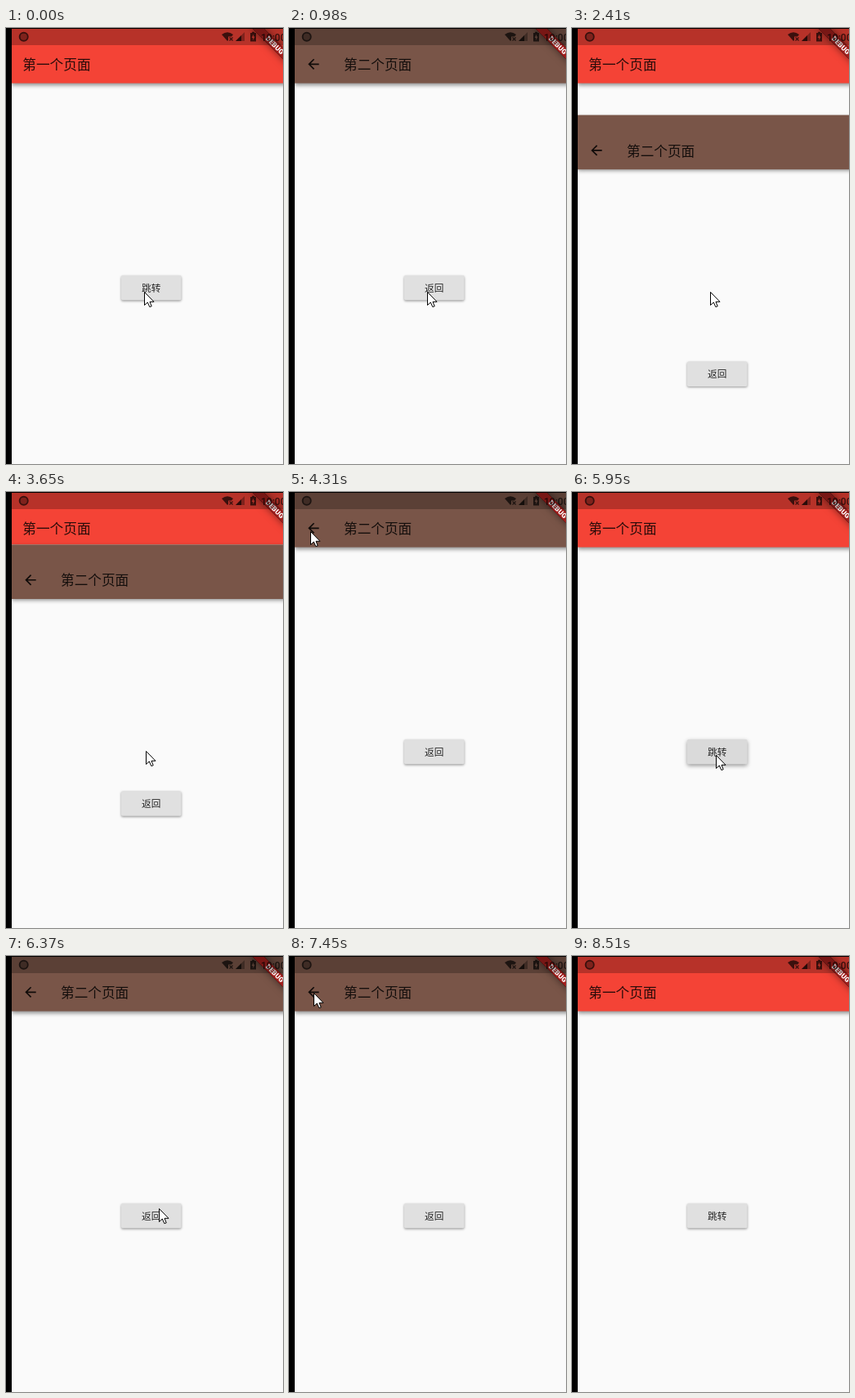
Animation of 339x534 px, one loop 9.1 s. Source, as an HTML page with a canvas:

```html
<!DOCTYPE html>
<html lang="zh-CN">
<head>
<meta charset="utf-8">
<style>
html, body { margin: 0; width: 100%; height: 100%; overflow: hidden; background: #000; }
canvas { display: block; }
</style>
</head>
<body>
<canvas id="stage" width="339" height="534"></canvas>
<script>
const ctx = document.getElementById('stage').getContext('2d');
const LOOP = 9100, TICK = 130, SLIDE = 300, PRESS = 260;
const LEFT = 7, TOP = 1, WIDTH = 342, HEIGHT = 569;
const CJK = '"Noto Sans CJK SC", "Noto Sans CJK", sans-serif';

// The second page alternately opens and closes; `elapsed` is how far each slide is when first seen.
const slides = [
  { at: 850, elapsed: 213 }, { at: 2410, elapsed: 140 },
  { at: 3650, elapsed: 185 }, { at: 4860, elapsed: 154 },
  { at: 6210, elapsed: 226 }, { at: 8130, elapsed: 150 }
];
const journeys = [
  { start: 2690, end: 3230, from: [169, 323], via: [170, 320], to: [171, 317] },
  { start: 3800, end: 4310, from: [171, 317], via: [100, 180], to: [26, 48] },
  { start: 4860, end: 5810, from: [26, 48], via: [70, 190], to: [176, 322] },
  { start: 6200, end: 7450, from: [176, 322], via: [371, 85], to: [30, 45] },
  { start: 8250, end: 8510, from: [30, 45], via: [165, 300], to: [300, 560] }
];

const arrow = new Path2D('M20 11H7.83l5.59-5.59L12 4l-8 8 8 8 1.41-1.41L7.83 13H20z');
const pointer = new Path2D('M.5.5V16.5L4.3 13L6.8 18.6L9.2 17.8L7 12.3H12z');

// Material standard curve: cubic-bezier(.4, 0, .2, 1)
function ease(x) {
  let low = 0, high = 1;
  for (let i = 0; i < 20; i++) {
    const s = (low + high) / 2, r = 1 - s;
    if (1.2 * r * r * s + .6 * r * s * s + s ** 3 < x) low = s; else high = s;
  }
  return low * low * (3 - 2 * low);
}

const ticked = age => TICK * Math.floor(age / TICK);

function sheetAt(t) {
  const index = slides.findLastIndex(s => s.at <= t);
  const { at, elapsed } = slides.at(index);
  const progress = Math.min(1, (elapsed + ticked((t - at + LOOP) % LOOP)) / SLIDE);
  const open = index % 2 === 0;
  const shown = open ? ease(progress) : ease(1 - progress);
  return { open, offset: HEIGHT * (1 - shown) };
}

function cursorAt(t) {
  const { start, end, from, via, to } = journeys.findLast(j => j.start <= t) ?? journeys[0];
  if (t >= end) return to;
  const u = ease(Math.max(0, ticked(t - start) / (end - start))), v = 1 - u;
  return from.map((a, i) => Math.round(v * v * a + 2 * u * v * via[i] + u * u * to[i]));
}

function rect(x, y, w, h, fill) {
  ctx.fillStyle = fill;
  ctx.fillRect(x, y, w, h);
}

function shape(path, fill) {
  ctx.fillStyle = fill;
  ctx.fill(path instanceof Path2D ? path : new Path2D(path));
}

function circle(x, y, r) {
  const path = new Path2D();
  path.arc(x, y, r, 0, 2 * Math.PI);
  return path;
}

function label(text, x, y, font, fill, align = 'left') {
  ctx.font = font;
  ctx.textAlign = align;
  ctx.fillStyle = fill;
  ctx.fillText(text, x, y);
}

function at(x, y, draw) {
  ctx.save();
  ctx.translate(x, y);
  draw();
  ctx.restore();
}

function shadowed(blur, dy, alpha, draw) {
  ctx.save();
  ctx.shadowColor = `rgba(0,0,0,${alpha})`;
  ctx.shadowBlur = blur;
  ctx.shadowOffsetY = dy;
  draw();
  ctx.restore();
}

function button(text, pressed) {
  const box = new Path2D();
  box.roundRect(141, 303, 73.5, 30.3, 1.7);
  shadowed(pressed ? 5 : 3, pressed ? 2 : 1.2, .4,
    () => shape(box, pressed ? '#dadada' : '#e0e0e0'));
  label(text, 177.7, 322.6, `300 11.67px ${CJK}`, 'rgba(0,0,0,.83)', 'center');
}

function page(color, title, titleX, caption, pressed) {
  rect(LEFT, TOP, WIDTH, HEIGHT, '#fafafa');
  shadowed(5, 2, .45, () => rect(LEFT, TOP, WIDTH, 66.6, color));
  label(title, titleX, 51, `300 16.67px ${CJK}`, 'rgba(0,0,0,.83)');
  button(caption, pressed);
}

function backArrow() {
  at(20, 34.3, () => {
    ctx.scale(.833, .833);
    shape(arrow, 'rgba(0,0,0,.87)');
  });
}

function debugBanner() {
  at(LEFT + WIDTH, TOP, () => {
    ctx.rotate(Math.PI / 4);
    shadowed(10, 0, .5, () => rect(-34, 23.3, 68, 10, '#000'));
    rect(-34, 23.3, 68, 10, '#a01e1c');
    label('DEBUG', 0, 31.3, '900 8.5px Roboto, sans-serif', '#fff', 'center');
  });
}

function statusBar() {
  const ink = 'rgba(0,0,0,.68)', faint = 'rgba(0,0,0,.3)';
  rect(LEFT, TOP, WIDTH, 20, 'rgba(0,0,0,.25)');
  ctx.strokeStyle = ink;
  ctx.lineWidth = 2;
  ctx.stroke(circle(21.7, 10.7, 5));
  shape(circle(21.7, 10.7, 4), faint);
  shape('M264 8Q271 2.5 278 8L276 10.5H272V15L271 16z', ink);
  ctx.lineWidth = 1.2;
  ctx.stroke(new Path2D('M273.5 11.5l4 4m0-4l-4 4'));
  shape('M281 16L292 5V16z', faint);
  shape('M281 16L288 9V16z', ink);
  shape('M299 6H301V4.8H304V6H306V16.5H299zM303 7.5L300.7 12H302.2V15L304.5 10.5H303z', ink);
  label('10:00', 312, 15.5, '500 12px Roboto, sans-serif', ink);
}

function render(now) {
  const t = now % LOOP;
  const { open, offset } = sheetAt(t);
  const [x, y] = cursorAt(t);
  const onButton = y > 300 && y < 333;
  const pressed = onButton && slides.some(s => t >= s.at - PRESS && t < s.at);

  page('#f44336', '第一个页面', 20.3, '跳转', pressed && !open);
  at(0, offset, () => {
    page('#795548', '第二个页面', 67, '返回', pressed && open);
    backArrow();
  });
  debugBanner();
  statusBar();
  rect(0, 0, LEFT, 534, '#000');
  rect(0, 0, 339, TOP, '#000');

  at(t < journeys[0].start ? 169 : x, y, () => {
    shape(pointer, '#fff');
    ctx.strokeStyle = '#000';
    ctx.lineWidth = 1;
    ctx.stroke(pointer);
  });
  requestAnimationFrame(render);
}
requestAnimationFrame(render);
</script>
</body>
</html>
```
